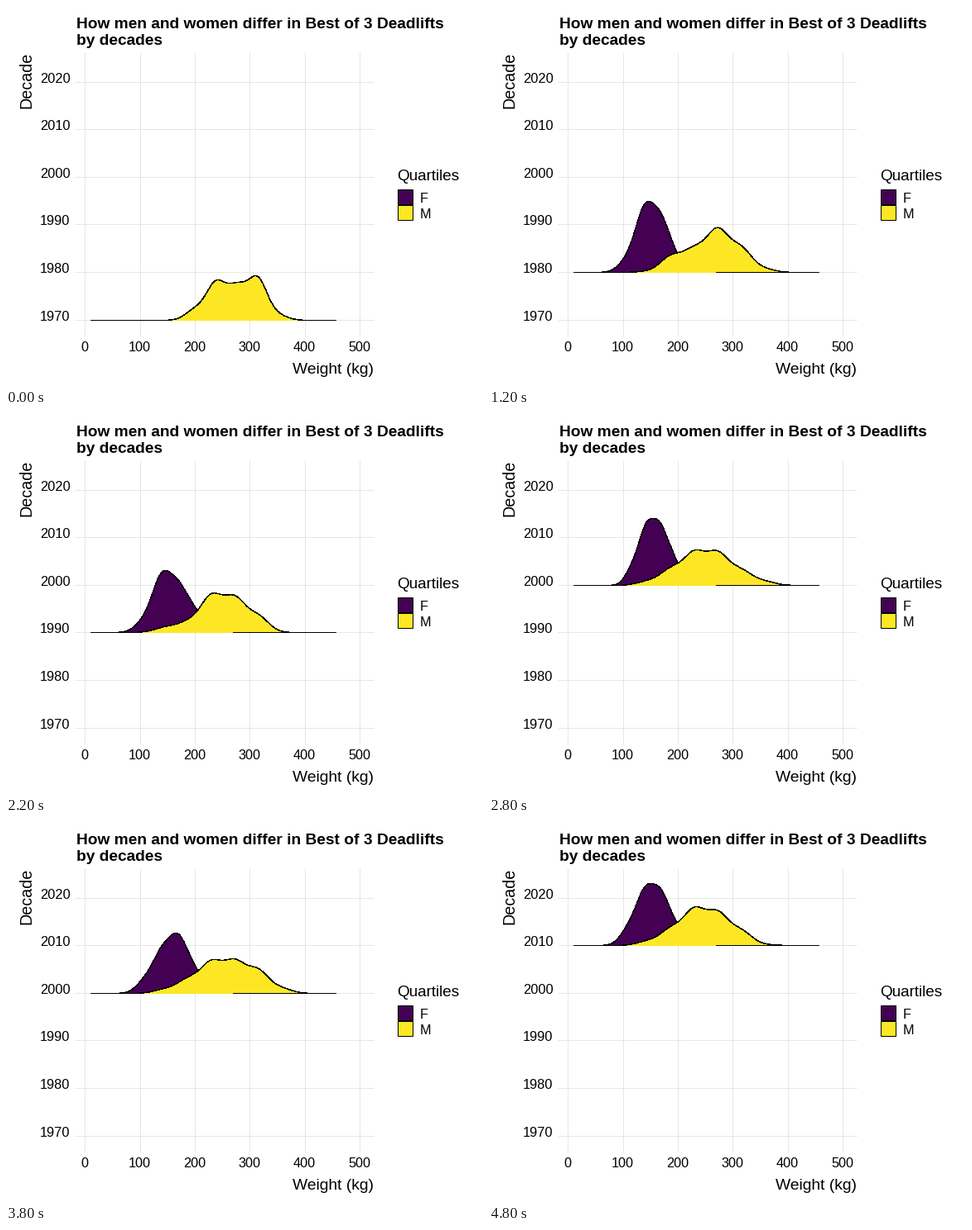
Recreate the animation shown at these times as a matplotlib script. Size 576 by 460 pixels, loop 5000 ms.

```python
import numpy as np
import matplotlib.pyplot as plt
from matplotlib.animation import FuncAnimation
from matplotlib.patches import Rectangle

W, H, DPI = 576, 460, 64
PX = 72 / DPI  # points per pixel
PURPLE, YELLOW, GRID = "#440154", "#FDE725", "#E6E6E6"
LEFT, RIGHT = 102, 399  # ends of the ridge baselines
plt.rcParams["font.family"] = "Liberation Sans"
plt.rcParams["path.snap"] = False

DECADE = np.repeat(range(5), [4, 5, 5, 6, 5])

# A ridge is a row of evenly spaced bells. Its weights are given at a few
# key times and blended linearly in between.
MEN = {0: (0, 11, 39, 33, 44, 5),
       3: (1, 28, 33, 21, 37, 3),
       6: (1, 19, 26, 49, 28, 4),
       11: (6, 12, 42, 39, 19, 0),
       16: (4, 23, 34, 35, 16, 8),
       20: (5, 14, 36, 36, 30, 5),
       24: (5, 19, 41, 37, 17, 1)}
WOMEN = {6: (14, 70, 56, 12),
         11: (13, 62, 48, 22),
         16: (18, 40, 48, 25),
         20: (13, 44, 62, 23),
         24: (18, 55, 52, 17)}
# Height of the tallest ridge at key times
PEAKS = {0: 54, 3: 42, 4: 74, 7: 92, 9: 103, 11: 75, 14: 81,
         16: 62, 18: 71, 20: 75, 24: 75}

x = np.linspace(LEFT, RIGHT, 595)


def grid_x(i):
    return np.floor(95.6 + 66.4 * i) + 0.5


def grid_y(i):
    return np.floor(380.05 - 57.6 * i) + 0.5


def bells(keys, n, first, gap, spread):
    """Sum of evenly spaced bells with weights blended for frame n."""
    weights = [np.interp(n, list(keys), col) for col in zip(*keys.values())]
    return sum(w * np.exp(-0.5 * ((x - first - gap * i) / spread) ** 2)
               for i, w in enumerate(weights))


def fit_peak(y, height):
    """Raise the peak to a height and narrow the curve to keep its area."""
    k = height / y.max()
    c = x[y.argmax()]
    return k * np.interp(c + (x - c) * k, x, y, left=0, right=0)


fig = plt.figure(figsize=(W / DPI, H / DPI), dpi=DPI, facecolor="white")
ax = fig.add_axes([0, 0, 1, 1])
ax.set(xlim=(0, W), ylim=(H, 0))
ax.axis("off")


def label(tx, ty, text, size, **kw):
    ax.text(tx, ty, text, fontsize=size * PX, va="baseline", color="black",
            rotation_mode="anchor", **kw)


def thin_line(z):
    # Without antialiasing every touched pixel is filled, so this is 1 px wide
    return ax.plot([], [], color="black", lw=0.4 * PX, zorder=z,
                   antialiased=False, solid_capstyle="butt")[0]


def ridge(color, z):
    fill, = ax.fill([0], [0], color=color, lw=0, zorder=z, antialiased=False)
    return fill, thin_line(z + 0.1)


def set_ridge(parts, y, base):
    fill, line = parts
    curve = base - y
    bottom = np.full(x.size, base + 0.5)
    fill.set_xy(np.column_stack([np.r_[x, x[::-1]], np.r_[curve, bottom]]))
    line.set_data(x, curve)


for i in range(6):
    gx, gy = grid_x(i), grid_y(i)
    ax.plot([gx, gx], [57, 400], color=GRID, lw=PX, zorder=1)
    ax.plot([84, 444], [gy, gy], color=GRID, lw=PX, zorder=1)
    label(gx - 1, 418, str(100 * i), 16.2, ha="center")
    label(77.5, gy + 0.5, str(1970 + 10 * i), 16.4, ha="right")

label(85, 27, "How men and women differ in Best of 3 Deadlifts", 19.1,
      weight="bold")
label(85, 47, "by decades", 19.1, weight="bold")
label(444, 445, "Weight (kg)", 19.2, ha="right")
label(30.5, 124.5, "Decade", 19.7, rotation=90)
label(471.7, 211, "Quartiles", 18.9)
for i, (name, color) in enumerate((("F", PURPLE), ("M", YELLOW))):
    ax.add_patch(Rectangle((473.5, 222.5 + 19 * i), 18, 18, fc=color,
                           ec="black", lw=PX))
    label(499.5, 238 + 19 * i, name, 16.2)

women, men = ridge(PURPLE, 3), ridge(YELLOW, 4)
tail = thin_line(5)


def update(n):
    base = grid_y(DECADE[n])
    peak = np.interp(n, list(PEAKS), list(PEAKS.values()))
    both = DECADE[n] > 0
    y_men = bells(MEN, n, first=192, gap=28, spread=13)
    if both:
        y_women = bells(WOMEN, n, first=168, gap=20, spread=11)
        set_ridge(women, fit_peak(y_women, peak), base)
        tail.set_data([274, RIGHT], [base, base])
    else:
        y_men = fit_peak(y_men, peak)
    set_ridge(men, y_men, base)
    for part in (*women, tail):
        part.set_visible(both)
    return (*women, *men, tail)


anim = FuncAnimation(fig, update, frames=len(DECADE), interval=200,
                     repeat=True, repeat_delay=0, blit=False)
plt.show()
```
